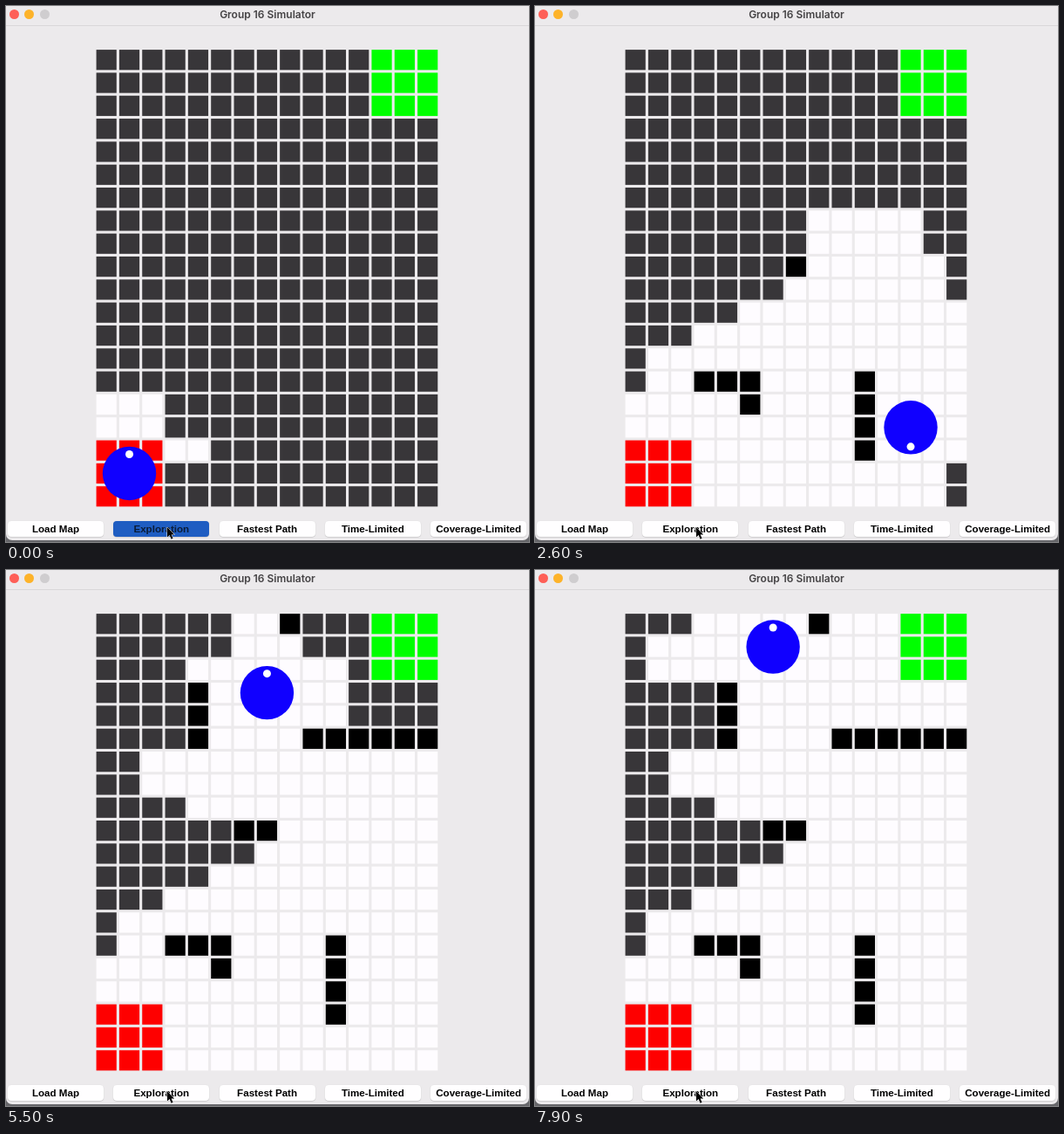
An HTML page with a canvas for the animation above (8 s loop, 600 by 614 pixels).

```html
<!DOCTYPE html>
<html lang="en">
<head>
<meta charset="utf-8">
<title>Group 16 Simulator</title>
<style>
  html, body { margin: 0; width: 100%; height: 100%; overflow: hidden; background: #66666a; }
  .window {
    position: absolute; left: 0; top: 0; width: 600px; height: 612px;
    background: #eceaec; border-radius: 0 0 7px 7px; overflow: hidden;
  }
  .bar {
    position: absolute; left: 0; top: 0; width: 599px; height: 22px;
    border-bottom: 1px solid #d9d7d9; width: 600px;
    font: 600 12px/19px Inter, sans-serif; color: #454345; text-align: center;
  }
  .light { position: absolute; top: 4px; width: 11px; height: 11px; border-radius: 50%; }
  canvas { position: absolute; left: 0; top: 0; }
  .button {
    position: absolute; top: 589.5px; width: 110px; height: 18px; border-radius: 4px;
    background: #fffeff; box-shadow: 0 .5px 1px #b4b2b4;
    font: bold 11.6px/17.5px "Liberation Sans", Arial, sans-serif;
    color: #000; text-align: center; white-space: nowrap;
  }
  .pressed { animation: release 8s step-end infinite; }
  @keyframes release {
    0% { background: #1f5dc2; color: #0a1c38; }
    2.5%, 100% { background: #fffeff; color: #000; }
  }
  .cursor { position: absolute; left: 183px; top: 595px; }
</style>
</head>
<body>
<div class="window">
  <div class="bar">Group 16 Simulator</div>
  <i class="light" style="left:3.5px;background:#fe5f57"></i>
  <i class="light" style="left:20.5px;background:#fdb32a"></i>
  <i class="light" style="left:38.5px;background:#cfcdcf"></i>
  <canvas id="arena" width="600" height="585"></canvas>
  <div class="button" style="left:2px">Load Map</div>
  <div class="button pressed" id="explore" style="left:123.3px">Exploration</div>
  <div class="button" style="left:244.6px">Fastest Path</div>
  <div class="button" style="left:365.9px">Time-Limited</div>
  <div class="button" style="left:487.2px">Coverage-Limited</div>
  <svg class="cursor" width="13" height="18" viewBox="-2 -2 13 18">
    <path d="M0 0v11.5l2.6-2.4 2 4.6 2-.9-2-4.4h3.6z" fill="#000" stroke="#fff" stroke-width="1" paint-order="stroke"/>
  </svg>
</div>
<script>
const COLS = 15, ROWS = 20, PITCH = 26.32, SIZE = 23.2, LEFT = 103.6, TOP = 50.1;
const LOOP = 8000, STEP = 100, STEPS = 78;
const UP = 0, LEFTWARD = 3;
const DIRS = [[0, -1], [1, 0], [0, 1], [-1, 0]];   // up, right, down, left

// Walls as [column, row, width, height]
const walls = [
  [3, 14, 3, 1], [5, 15, 1, 1], [10, 14, 1, 4], [6, 9, 2, 1],
  [9, 5, 6, 1], [4, 3, 1, 3], [8, 0, 1, 1]
];
const inside = (c, r) => c >= 0 && r >= 0 && c < COLS && r < ROWS;
const isWall = (c, r) => walls.some(([x, y, w, h]) => c >= x && c < x + w && r >= y && r < y + h);
const turn = (dir, by) => (dir + by + 4) % 4;

// The robot covers 3 by 3 cells; look at the strip of three next to one side.
function sideFree({ c, r, dir }, by) {
  const [dx, dy] = DIRS[turn(dir, by)];
  return [-1, 0, 1].every(k => {
    const x = c + 2 * dx - k * dy, y = r + 2 * dy + k * dx;
    return inside(x, y) && !isWall(x, y);
  });
}

// Sensors: three ahead, one each side at the front, one long-range in the middle of the left side.
const sensors = [
  { by: 0, shift: -1, range: 2 }, { by: 0, shift: 0, range: 2 }, { by: 0, shift: 1, range: 2 },
  { by: 1, shift: -1, range: 2 }, { by: -1, shift: 1, range: 2 }, { by: -1, shift: 0, range: 4 }
];

const seenAt = Array.from({ length: ROWS }, () => Array(COLS).fill(Infinity));

function sense({ c, r, dir }, time) {
  for (const { by, shift, range } of sensors) {
    const [dx, dy] = DIRS[turn(dir, by)];
    for (let d = 2; d < 2 + range; d++) {
      const x = c + d * dx - shift * dy, y = r + d * dy + shift * dx;
      if (!inside(x, y)) break;
      seenAt[y][x] = Math.min(seenAt[y][x], time);
      if (isWall(x, y)) break;
    }
  }
}

// Follow the wall on the right-hand side.
function explore() {
  const poses = [];
  let pose = { c: 1, r: 18, dir: UP }, turned = false;
  const record = () => { sense(pose, poses.length); poses.push(pose); };
  record();
  while (poses.length <= STEPS) {
    const { c, r, dir } = pose;
    if (!turned && sideFree(pose, 1)) {
      pose = { c, r, dir: turn(dir, 1) };
      turned = true;
    } else if (sideFree(pose, 0)) {
      pose = { c: c + DIRS[dir][0], r: r + DIRS[dir][1], dir };
      turned = false;
    } else {
      pose = { c, r, dir: turn(dir, -1) };
      turned = true;
      if (pose.dir === LEFTWARD) record();   // this turn takes two steps
    }
    record();
  }
  return poses;
}

const poses = explore();
const ctx = document.getElementById('arena').getContext('2d');

function cellColor(c, r, step) {
  if (c < 3 && r > 16) return '#fe0000';
  if (c > 11 && r < 3) return '#00ff00';
  if (seenAt[r][c] > step) return '#383639';
  return isWall(c, r) ? '#000' : '#fefcff';
}

function disc(x, y, radius, color) {
  ctx.fillStyle = color;
  ctx.beginPath();
  ctx.arc(x, y, radius, 0, 2 * Math.PI);
  ctx.fill();
}

function draw(step) {
  ctx.clearRect(0, 0, 600, 585);
  for (let r = 0; r < ROWS; r++) {
    for (let c = 0; c < COLS; c++) {
      ctx.fillStyle = cellColor(c, r, step);
      ctx.fillRect(LEFT + c * PITCH, TOP + r * PITCH, SIZE, SIZE);
    }
  }
  const { c, r, dir } = poses[step];
  const x = LEFT + c * PITCH + SIZE / 2, y = TOP + r * PITCH + SIZE / 2;
  disc(x, y, 30.7, '#1000ff');
  disc(x + 22 * DIRS[dir][0], y + 22 * DIRS[dir][1], 4.5, '#fff');
}

const press = document.getElementById('explore').getAnimations()[0];
const start = performance.now();
if (press) press.startTime = document.timeline.currentTime;

function frame() {
  const t = (performance.now() - start) % LOOP;
  draw(Math.min(STEPS, Math.max(0, Math.floor(t / STEP) - 1)));
  requestAnimationFrame(frame);
}
frame();
</script>
</body>
</html>
```
